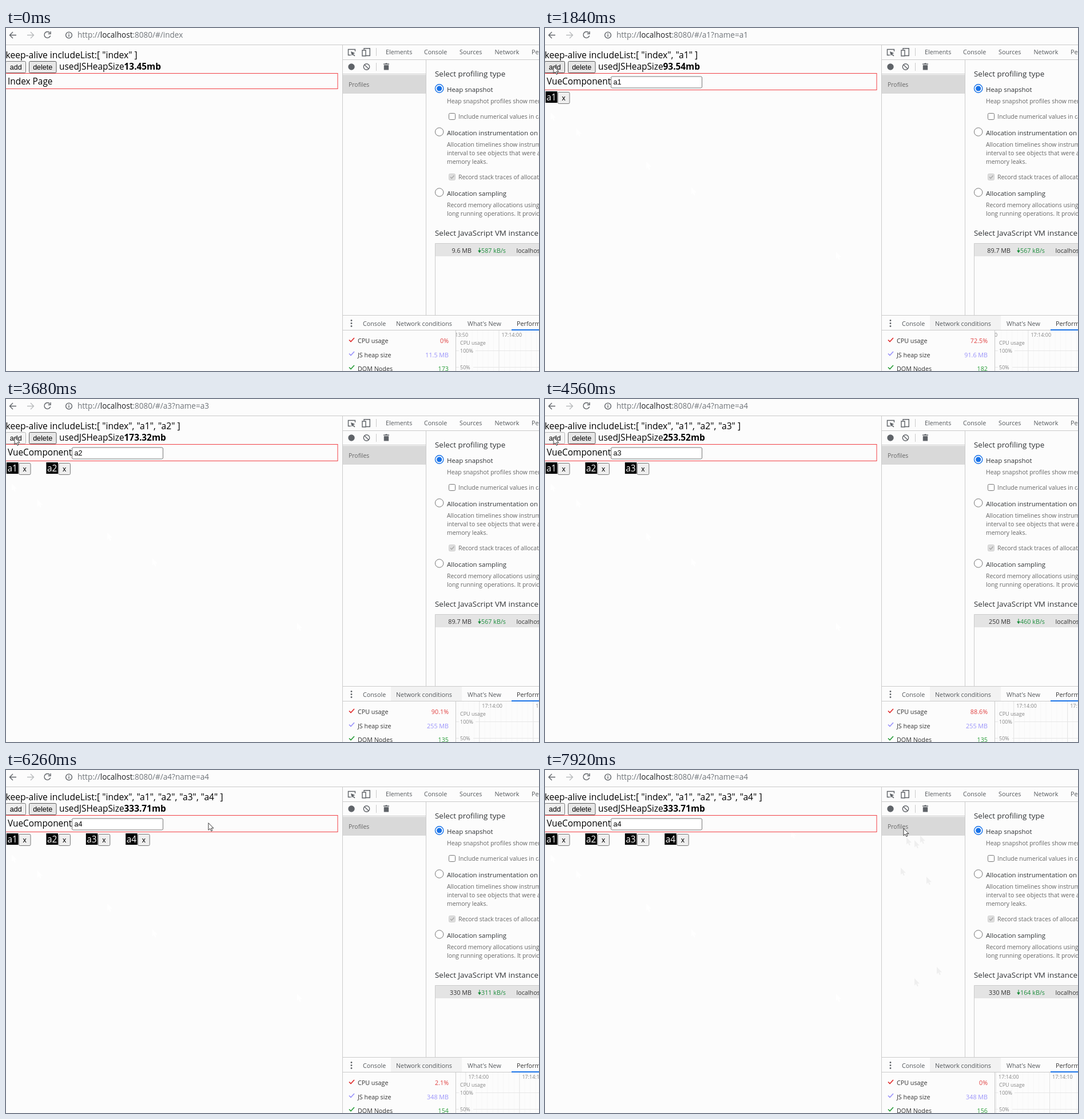
An HTML page that plays this animation: 932 px wide and 601 px high, repeating every 7.99 s.

```html
<!DOCTYPE html>
<html lang="en">
<head>
<meta charset="utf-8">
<title>Keep-alive heap demo</title>
<style>
html, body { margin: 0; width: 100%; height: 100%; overflow: hidden; background: #fcfcfc; }
svg { display: block; width: 100vw; height: 100vh; }
text { font-family: "Open Sans", "Noto Sans", sans-serif; white-space: pre; }
.page { font-size: 15.4px; fill: #000; }
#list { font-size: 15.65px; }
.url { font-size: 13.55px; fill: #70757a; }
.url .host { fill: #202124; }
.form { font: 12.5px "Liberation Sans", Arial, sans-serif; fill: #000; }
.button { fill: #efefef; stroke: #767676; }
.tab { font-size: 10.75px; fill: #54585c; }
.dark { fill: #333; }
.head { font-size: 13.45px; fill: #303336; }
.option { font-size: 11.45px; fill: #303336; }
.note { font-size: 10.45px; fill: #666; }
.axis { font-size: 9px; fill: #858585; }
.line { fill: none; stroke: #cbcbcb; }
.icon { fill: none; stroke: #5f6368; stroke-width: 1.4; }
.solid { fill: #5f6368; }
.end { text-anchor: end; }
.mid { text-anchor: middle; }
</style>
</head>
<body>
<svg viewBox="0 0 932 601">
  <defs>
    <path id="arrow" d="M0 0V12.6L2.9 9.9L4.9 14.3L6.9 13.4L5 9.2H9Z"/>
    <path id="tick" d="M-4.5 0L-1.5 3L4.5 -3.5" fill="none" stroke-width="1.7"/>
    <clipPath id="chart"><rect x="787" y="530" width="145" height="71"/></clipPath>
  </defs>
  <rect width="932" height="601" fill="#fcfcfc"/>
  <g id="trail"></g>

  <!-- address bar -->
  <g class="icon">
    <path d="M18 12.5H7M12 7L6.5 12.5L12 18"/>
    <path d="M37 12.5H48M43 7L48.5 12.5L43 18" stroke="#b9bbbd"/>
    <path d="M76.6 8.5A5.4 5.4 0 1 0 77.6 13.5M78 6V10.3H73.7"/>
    <circle cx="110" cy="12.5" r="5.4"/>
    <path d="M110 11.5V15.5M110 9V10.4"/>
  </g>
  <text class="url" x="125" y="17">http://<tspan class="host">localhost</tspan>:8080/#/<tspan id="route"></tspan></text>
  <path class="line" d="M0 29.5H932" stroke="#dcdcdc"/>

  <!-- page -->
  <text class="page" id="list" x="-.5" y="53"></text>
  <rect class="button" id="add" x="-.5" y="58.5" width="35" height="20" rx="2"/>
  <text class="form mid" x="17.3" y="73">add</text>
  <rect class="button" x="40.5" y="58.5" width="47.5" height="20" rx="2" style="fill:#e7e7e7;stroke:#5c5c5c"/>
  <text class="form mid" x="64.2" y="73">delete</text>
  <text class="page" x="93" y="73">usedJSHeapSize<tspan id="used" font-weight="700"></tspan></text>
  <rect id="frame" x="-2" y="79.5" width="582" height="27" fill="none" stroke="#f23f44"/>
  <text class="page" id="title" x="3" y="99"></text>
  <g id="field">
    <rect x="115.5" y="85" width="159" height="20" rx="2" fill="#fff" stroke="#767676"/>
    <text class="form" id="value" x="119.5" y="99.3"></text>
  </g>
  <g id="tags"></g>

  <!-- devtools frame -->
  <path class="line" d="M588.5 30V601M588 55.5H932M588 80.5H734M734.5 56V503M588 503.5H932M588 529.5H932M786.5 530V601M647.5 35V49M647.5 61V75"/>
  <g class="icon">
    <path d="M603 47.5H598.5V37.5H610.5V41"/>
    <path class="solid" d="M603 41L610.5 44L607.2 45.2L610.5 48.5L609.2 49.6L606 46.4L604.8 49Z" stroke="none"/>
    <path d="M626 38V35.7H636.3V48.5H629M623 39H629V49H623Z"/>
    <circle cx="630.5" cy="68" r="5.2"/>
    <path d="M626.8 64.3L634.2 71.7"/>
  </g>
  <circle class="solid" cx="604" cy="68" r="5.7"/>
  <path class="solid" d="M660 62.5H663L664 61.5H666L667 62.5H670V64H660ZM660.8 65H669.2V73.5H660.8Z"/>
  <g class="tab">
    <text x="664" y="46">Elements</text>
    <text x="731" y="46">Console</text>
    <text x="793" y="46">Sources</text>
    <text x="854.5" y="46">Network</text>
    <text x="919" y="46">Performance</text>
  </g>
  <rect x="589" y="82" width="145" height="33" fill="#d9d9d9"/>
  <text class="note" x="599" y="102.5">Profiles</text>

  <!-- profiling options -->
  <text class="head" x="750" y="85">Select profiling type</text>
  <g fill="#fff" stroke="#767676">
    <circle cx="757.7" cy="106" r="7.2" stroke="#1a73e8" stroke-width="1.4"/>
    <circle cx="757.7" cy="182" r="7.2"/>
    <circle cx="757.7" cy="288" r="7.2"/>
    <rect x="774.5" y="149.5" width="11" height="11" rx="2"/>
    <rect x="774.5" y="255.5" width="11" height="11" rx="2" fill="#dedede" stroke="#d0d0d0"/>
  </g>
  <circle cx="757.7" cy="106" r="4.6" fill="#1a73e8"/>
  <path d="M777 261L779.3 263.5L783.5 258.5" fill="none" stroke="#a6a6a6" stroke-width="1.4"/>
  <g class="option">
    <text x="771" y="111.5">Heap snapshot</text>
    <text x="771" y="188">Allocation instrumentation on timeline</text>
    <text x="771" y="294">Allocation sampling</text>
  </g>
  <g class="note">
    <text x="771" y="132">Heap snapshot profiles show memory</text>
    <text x="791" y="159">Include numerical values in capture</text>
    <text x="771" y="208">Allocation timelines show instrumented</text>
    <text x="771" y="223">interval to see objects that were allocated</text>
    <text x="771" y="238">memory leaks.</text>
    <text x="791" y="265">Record stack traces of allocations</text>
    <text x="771" y="314">Record memory allocations using sampling</text>
    <text x="771" y="329">long running operations. It provides</text>
  </g>
  <text class="head" x="750" y="364">Select JavaScript VM instance</text>
  <rect x="751" y="378" width="181" height="22" fill="#e4e4e4"/>
  <path class="line" d="M750.5 503V377.5H932"/>
  <g class="tab">
    <text class="end dark" id="vm" x="814" y="393.5"></text>
    <text class="end" id="rate" x="874" y="393.5" style="fill:#1e8e3e"></text>
    <text class="dark" x="892.5" y="393.5">localhost:8080</text>
  </g>
  <path d="M828 385V391M825.8 390H830.2L828 393.5Z" fill="#1e8e3e" stroke="#1e8e3e"/>

  <!-- drawer -->
  <rect id="tabHover" x="673" y="504" width="124" height="25"/>
  <path id="tabClose" d="M786.5 514L792 519.5M792 514L786.5 519.5" stroke="#333" stroke-width="1.4"/>
  <g class="solid">
    <circle cx="604" cy="512.5" r="1.4"/>
    <circle cx="604" cy="517.5" r="1.4"/>
    <circle cx="604" cy="522.5" r="1.4"/>
  </g>
  <g class="tab">
    <text x="624" y="522">Console</text>
    <text x="682" y="522">Network conditions</text>
    <text x="807" y="522">What's New</text>
    <text class="dark" x="893" y="522">Performance monitor</text>
  </g>
  <rect x="884" y="528" width="48" height="2" fill="#1a73e8"/>
  <use href="#tick" x="604.5" y="546.5" stroke="#e02b2b"/>
  <use href="#tick" x="604.5" y="570.5" stroke="#9a93fa"/>
  <use href="#tick" x="604.5" y="594.5" stroke="#2a9d3a"/>
  <g class="tab">
    <text class="dark" x="615" y="552">CPU usage</text>
    <text class="dark" x="615" y="576.5">JS heap size</text>
    <text class="dark" x="615" y="601">DOM Nodes</text>
    <text class="end" id="cpu" x="774" y="552" style="fill:#e04040"></text>
    <text class="end" id="heap" x="774" y="576.5" style="fill:#9a93fa"></text>
    <text class="end" id="nodes" x="774" y="601" style="fill:#2a9d3a"></text>
  </g>
  <g clip-path="url(#chart)">
    <g id="timeline" class="axis"></g>
    <path d="M787 565.5H792M821 565.5H932M787 594.5H792M817 594.5H932" stroke="#e6e6e6"/>
    <g class="axis">
      <text x="794" y="555">CPU usage</text>
      <text x="794" y="568.5">100%</text>
      <text x="794" y="597.5">50%</text>
    </g>
  </g>

  <use id="cursor" href="#arrow" fill="#fff" stroke="#222" stroke-width=".9"/>
</svg>
<script>
const LOOP = 7990;
const $ = id => document.getElementById(id);
const show = (el, on) => el.setAttribute('visibility', on ? 'visible' : 'hidden');
const setText = (id, s) => { if ($(id).textContent !== s) $(id).textContent = s; };

// [time, value] steps: the last one reached holds
const stepAt = (steps, t) => steps.reduce((now, [at, v]) => t >= at ? v : now, steps[0][1]);

const routeSteps = [[0, 0], [1000, 1], [2050, 2], [3150, 3], [4250, 4]];
const viewSteps = [[0, 0], [1450, 1], [2550, 2], [3750, 3], [4800, 4]];
const usedHeap = ['13.45', '93.54', '173.32', '253.52', '333.71'];
const meters = {
  cpu: [[0, '0%'], [450, '1%'], [950, '8.3%'], [1450, '72.5%'], [2600, '79.8%'], [3350, '90.1%'],
    [4200, '88.6%'], [4750, '83.2%'], [5200, '44.1%'], [5800, '2.1%'], [6300, '0.6%'], [7300, '0.9%'], [7700, '0%']],
  heap: [[0, '11.5 MB'], [1450, '91.6 MB'], [2600, '171 MB'], [3350, '255 MB'], [4750, '348 MB']],
  nodes: [[0, '173'], [450, '175'], [1450, '182'], [3350, '135'], [4750, '148'], [5200, '152'], [5800, '154'], [7300, '156']],
  vm: [[0, '9.6 MB'], [1500, '89.7 MB'], [3900, '250 MB'], [5900, '330 MB']],
  rate: [[0, '587 kB/s'], [1500, '567 kB/s'], [3900, '460 kB/s'], [5900, '311 kB/s'], [7400, '164 kB/s']]
};

// time, x, y; a fourth entry leaves a faint mark behind
const path = [
  [70, 760, 601], [150, 735, 517], [270, 509, 392, 1], [340, 256, 279, 1], [410, 177, 234, 1],
  [480, 55, 176, 1], [550, 10, 148, 1], [640, -4, 89], [720, -4, 88], [880, 15, 67], [5000, 15, 67],
  [5300, 120, 88], [5460, 223, 80], [5860, 214, 66], [6200, 235, 72], [6300, 430, 106, 1],
  [6380, 632, 118, 1], [6440, 656, 115, 1], [6500, 646, 123, 1], [6600, 622, 171, 1], [6700, 601, 240],
  [6780, 646, 365, 1], [6850, 690, 520], [6910, 702, 586], [7120, 712, 588], [7220, 695, 520],
  [7320, 685, 345, 1], [7450, 667, 187, 1], [7600, 640, 120], [7780, 627, 103], [LOOP, 627, 102]
];

function cursorAt(t) {
  const i = path.findIndex(p => p[0] > t);
  const [t0, x0, y0] = path[i - 1], [t1, x1, y1] = path[i];
  const k = (t - t0) / (t1 - t0);
  return [x0 + (x1 - x0) * k, y0 + (y1 - y0) * k];
}

const tagX = i => 1 + 69.4 * i;
$('tags').innerHTML = [0, 1, 2, 3].map(i => `<g transform="translate(${tagX(i)})">
  <rect y="111" width="20.5" height="20" fill="#000"/>
  <text class="page" x="1.5" y="126.5" style="fill:#fff">a${i + 1}</text>
  <rect class="button" x="21.5" y="112.5" width="20.5" height="20" rx="2"/>
  <text class="form mid" x="31.7" y="127">x</text></g>`).join('');
const tags = [...$('tags').children];

const marks = path.filter(p => p[3]);
$('trail').innerHTML = marks.map(([, x, y]) =>
  `<use href="#arrow" x="${x}" y="${y}" fill="${x > 588 ? '#efefef' : '#fff'}"/>`).join('');
const trail = [...$('trail').children];

const SECOND = 9.4, ORIGIN = 862;
let ticks = '';
for (let s = -10; s <= 20; s++) {
  const x = ORIGIN + s * SECOND;
  ticks += `<path d="M${x} 530V601" stroke="${s % 10 ? '#f7f7f7' : '#e2e2e2'}"/>`;
}
['17:13:50', '17:14:00', '17:14:10'].forEach((label, i) => {
  ticks += `<text x="${ORIGIN + (i - 1) * 10 * SECOND + 4.5}" y="541">${label}</text>`;
});
$('timeline').innerHTML = ticks;

function render(t) {
  const route = stepAt(routeSteps, t), view = stepAt(viewSteps, t);
  const names = ['index', 'a1', 'a2', 'a3', 'a4'].slice(0, view + 1);
  setText('route', route ? `a${route}?name=a${route}` : 'index');
  setText('list', `keep-alive includeList:[ ${names.map(n => `"${n}"`).join(', ')} ]`);
  setText('used', usedHeap[view] + 'mb');
  setText('title', view ? 'VueComponent' : 'Index Page');
  setText('value', 'a' + view);
  show($('field'), view > 0);
  $('frame').setAttribute('height', view ? 29 : 27);
  tags.forEach((tag, i) => show(tag, i < view));
  for (const id in meters) setText(id, stepAt(meters[id], t));

  const pressed = route > view, hover = t > 850 && t < 5050;
  $('add').style.fill = pressed ? '#f5f5f5' : hover ? '#e5e5e5' : '#efefef';
  $('add').style.stroke = pressed ? '#b5b5b5' : hover ? '#4f4f4f' : '#767676';

  const onTab = (t > 120 && t < 200) || (t > 6840 && t < 7270);
  $('tabHover').setAttribute('fill', onTab ? '#dee1e3' : '#f2f2f2');
  show($('tabHover'), t > 120);
  show($('tabClose'), onTab);

  $('timeline').setAttribute('transform', `translate(${-t * 0.00928})`);
  trail.forEach((mark, i) => show(mark, t > marks[i][0] + 30));
  show($('cursor'), t >= 70);
  if (t >= 70) $('cursor').setAttribute('transform', `translate(${cursorAt(t)})`);
}

const start = performance.now();
function tick() {
  render((performance.now() - start) % LOOP);
  requestAnimationFrame(tick);
}
tick();
</script>
</body>
</html>
```
